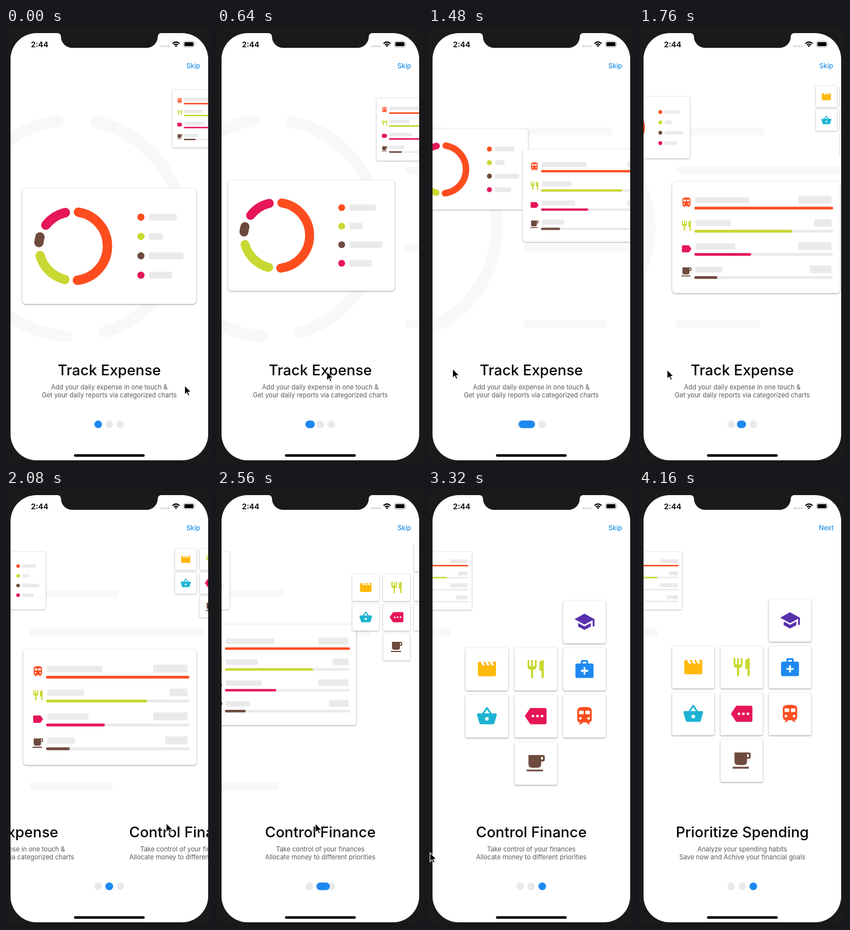
Recreate the animation shown at these times as an HTML page. Size 362 by 766 pixels, loop 4.2 s.

```html
<!DOCTYPE html>
<html lang="en">
<head>
<meta charset="utf-8">
<title>Expense onboarding</title>
<style>
  html, body { margin: 0; width: 100%; height: 100%; overflow: hidden; background: #1a1a1b; }
  svg { display: block; }
  text { font-family: Inter, "Open Sans", sans-serif; }
  .title { font-size: 25.9px; font-weight: 500; text-anchor: middle; fill: #050505; }
  .note { font-size: 11.35px; text-anchor: middle; fill: #5a5a5a; }
  .action { font-size: 11.7px; font-weight: 500; text-anchor: middle; fill: #1e8fe6; }
  .clock { font-size: 13.6px; font-weight: 600; }
  .sheet { fill: #fff; filter: drop-shadow(.8px 1.8px 1.6px rgba(0, 0, 0, .4)); }
  .ring { fill: none; stroke-linecap: round; }
</style>
</head>
<body>
<svg width="362" height="766" viewBox="0 0 362 766">
  <rect width="362" height="766" fill="#fff"/>
  <g id="backdrop"></g>
  <g id="chart"></g>
  <g id="list"></g>
  <g id="tiles"></g>
  <g id="copy"></g>
  <g fill="#e9e9ea">
    <circle cx="162.8" cy="699.5" r="6.7"/>
    <circle cx="182.3" cy="699.5" r="6.7"/>
    <circle cx="201.8" cy="699.5" r="6.7"/>
    <rect id="pill" y="692.8" height="13.4" rx="6.7" fill="#1d89f0"/>
  </g>
  <text id="action" class="action" x="330.7" y="70.5">Skip</text>
  <rect x="120" y="752.3" width="125" height="4.4" rx="2.2"/>

  <!-- bezel with notch -->
  <path fill="#1a1a1b" fill-rule="evenodd" d="M0 0H362V766H0Z
    M54 9H91A6 6 0 0 1 97 15A20 20 0 0 0 117 35H248A20 20 0 0 0 268 15A6 6 0 0 1 274 9H311
    A46 46 0 0 1 357 55V717A46 46 0 0 1 311 763H54A46 46 0 0 1 8 717V55A46 46 0 0 1 54 9Z"/>

  <text class="clock" x="44" y="34">2:44</text>
  <path d="M274.3 32.2H288" stroke="#c9c9c9" stroke-width="3.2" stroke-linecap="round" stroke-dasharray="0 4.3"/>
  <g fill="none" stroke="#000" stroke-width="2.1">
    <path d="M294 27.4Q300.2 21.7 306.4 27.4M296.5 30Q300.2 26.8 303.9 30"/>
    <path d="M298 31.3Q300.2 29.6 302.4 31.3L300.2 33.7Z" fill="#000" stroke="none"/>
  </g>
  <rect x="313.5" y="23.5" width="19" height="10" rx="2.8" fill="none" stroke="#a2a2a2"/>
  <rect x="315" y="25" width="16" height="7" rx="1.5"/>
  <path d="M333.8 26.8Q335.6 28.5 333.8 30.4Z" fill="#999"/>

  <path id="cursor" d="M0 0V16L3.7 12.6 6 18 8.6 17 6.3 11.6H11.4Z" stroke="#fff" stroke-width="1.1"/>
</svg>

<script>
const LOOP = 4200, STEP = 40, PAGE = 314;
const FAINT = '#f8f8f8', GRAY = '#eaeaea';
const ORANGE = '#fd4d1f', LIME = '#c8d832', PINK = '#e51757', BROWN = '#6e4a3e';
const AMBER = '#ffb80b', BLUE = '#1d89f0', TEAL = '#1cb3d2', VIOLET = '#5930ac';
const $ = id => document.getElementById(id);

// 24-unit icon shapes
const hole = (x, y, r = 1.5) => `M${x - r} ${y}a${r} ${r} 0 1 0 ${2 * r} 0 ${r} ${r} 0 1 0 ${-2 * r} 0z`;
const ICON = {
  film: 'M18 4l2 4h-3l-2-4h-2l2 4h-3l-2-4H8l2 4H7L5 4H4q-2 0-2 2v12q0 2 2 2h16q2 0 2-2V4z',
  food: 'M11 9H9V2H7v7H5V2H3v7q0 3.6 3.8 4v9h2.4v-9Q13 12.6 13 9V2h-2zM16 6v8h2.5v8H21V2q-5 .4-5 4z',
  kit: 'M20 6h-4V4q0-2-2-2h-4q-2 0-2 2v2H4q-2 0-2 2v12q0 2 2 2h16q2 0 2-2V8q0-2-2-2zM10 4h4v2h-4zM16 15h-3v3h-2v-3H8v-2h3v-3h2v3h3z',
  basket: 'M17.2 9l-4.4-6.6q-.8-.8-1.6 0L6.8 9H2q-1 0-1 1.2l2.6 9.3q.4 1.5 1.9 1.5h13q1.5 0 1.9-1.5L23 10.2Q23 9 22 9zM9 9l3-4.4L15 9z' + hole(12, 15, 2),
  more: 'M22 3H7q-1 0-1.6.9L0 12l5.4 8.1q.6.9 1.7.9H22q2 0 2-2V5q0-2-2-2z' + hole(9, 12) + hole(14, 12) + hole(19, 12),
  train: 'M12 2C8 2 4 2.5 4 6v9.5Q4 19 7.5 19L6 20.5v.5h2.2l2-2H14l2 2h2v-.5L16.5 19q3.5 0 3.5-3.5V6c0-3.5-3.6-4-8-4zM6 6h5v4H6zM13 6h5v4h-5z' + hole(7.5, 14.5) + hole(16.5, 14.5),
  school: 'M5 13.2v4L12 21l7-3.8v-4L12 17zM12 3L1 9l11 6 9-4.9V17h2V9z',
  cup: 'M20 3H4v10q0 4 4 4h6q4 0 4-4v-3h2q2 0 2-2V5q0-2-2-2zM18 5h2v3h-2zM2 19h18v2H2z',
  tag: 'M17.6 5.8Q17 5 16 5H5q-2 0-2 2v10q0 2 2 2h11q1 0 1.6-.8L22 12z'
};

const rect = (x, y, w, h, r, fill) =>
  `<rect x="${x}" y="${y}" width="${w}" height="${h}" rx="${r}" fill="${fill}"/>`;
// White card centred on a point
const sheet = (x, y, w, h, r) =>
  `<rect class="sheet" x="${x - w / 2}" y="${y - h / 2}" width="${w}" height="${h}" rx="${r}"/>`;
const icon = (name, x, y, k, fill) =>
  `<path d="${ICON[name]}" fill="${fill}" fill-rule="evenodd" transform="translate(${x} ${y}) scale(${k}) translate(-12 -12)"/>`;

function arc(cx, cy, r, from, to, width, color) {
  const at = deg => {
    const a = deg * Math.PI / 180;
    return `${cx + r * Math.cos(a)} ${cy + r * Math.sin(a)}`;
  };
  return `<path class="ring" stroke="${color}" stroke-width="${width}" d="M${at(from)}A${r} ${r} 0 0 1 ${at(to)}"/>`;
}

// Large pale echoes of the ring and of the list
$('backdrop').innerHTML =
  [[-78, 73.5], [93.5, 150], [230, 262]].map(([a, b]) => arc(119, 353, 191.5, a, b, 21, FAINT)).join('') +
  [[176, 156], [245, 309], [381, 248], [516, 147]].map(([y, w]) => rect(44 + PAGE, y, w, 13, 3, FAINT)).join('');

// Card artwork is laid out around its own centre
$('chart').innerHTML = sheet(0, 0, 307, 204, 6) +
  [[ORANGE, -81, 83, 49], [LIME, 104, 164, 24.5], [BROWN, 186, 195.5, 61], [PINK, 217.5, 257, 41]]
    .map(([c, from, to, w], i) => {
      const y = 34.2 * (i - 1.5);
      return arc(-64, 0, 60.7, from, to, 16.5, c) +
        `<circle cx="55.8" cy="${y}" r="6.3" fill="${c}"/>` + rect(70, y - 6, w, 12, 3, GRAY);
    }).join('');

$('list').innerHTML = sheet(0, 0, 307, 204.5, 6) +
  [['train', ORANGE, 98, 61, 1], ['food', LIME, 65, 32, .705], ['tag', PINK, 73, 61, .41], ['cup', BROWN, 49, 40, .166]]
    .map(([name, c, label, chip, share], i) => {
      const y = 42.3 * (i - 1.5);
      return icon(name, -127.5, y, .92, c) +
        rect(-111, y - 10, label, 11, 2, GRAY) +
        rect(138 - chip, y - 12, chip, 14, 2, GRAY) +
        rect(-113, y + 7.7, 254, 5, 2.5, GRAY) +
        rect(-113, y + 7.7, 254 * share, 5, 2.5, c);
    }).join('');

const GRID = [
  [null, null, ['school', VIOLET]],
  [['film', AMBER], ['food', LIME], ['kit', BLUE]],
  [['basket', TEAL], ['more', PINK], ['train', ORANGE]],
  [null, ['cup', BROWN], null]
];
$('tiles').innerHTML = GRID.flatMap((row, j) => row.map((cell, i) => {
  if (!cell) return '';
  const x = 86.2 * (i - 1), y = 83.2 * (j - 1.5);
  return sheet(x, y, 75.5, 75.5, 3) + icon(cell[0], x, y - .3, 1.6, cell[1]);
})).join('');

$('copy').innerHTML = [
  ['Track Expense', 'Add your daily expense in one touch &amp;', 'Get your daily reports via categorized charts'],
  ['Control Finance', 'Take control of your finances', 'Allocate money to different priorities'],
  ['Prioritize Spending', 'Analyze your spending habits', 'Save now and Achive your financial goals']
].map(([title, a, b], i) => {
  const x = 182.4 + i * PAGE;
  const line = (cls, y, s) => `<text class="${cls}" x="${x}" y="${y}">${s}</text>`;
  return line('title', 612.5, title) + line('note', 638, a) + line('note', 652, b);
}).join('');

const clamp = v => Math.min(1, Math.max(0, v));
const smooth = v => { v = clamp(v); return v * v * (3 - 2 * v); };

// Steady drag, then an exponential snap to just past the next page
function swipe(t, start, release) {
  const drag = .000617 * Math.max(0, Math.min(t, release) - start);
  const snap = 1 - Math.exp(-Math.max(0, t - release) / 88);
  return drag + (1.009 - drag) * snap;
}

const POINTER = [[0, 315.5, 631], [1000, 125.5, 592], [1700, 6, 606], [2080, 283, 588],
  [2880, 100.5, 589], [3320, 3.5, 640], [3400, -16, 650]];

function pointerAt(t) {
  const i = POINTER.findIndex(key => key[0] > t);
  if (i < 0) return POINTER[POINTER.length - 1].slice(1);
  const [t0, x0, y0] = POINTER[i - 1], [t1, x1, y1] = POINTER[i];
  const k = (t - t0) / (t1 - t0);
  return [x0 + (x1 - x0) * k, y0 + (y1 - y0) * k];
}

const place = (id, x, y, k = 1) =>
  $(id).setAttribute('transform', `translate(${x} ${y}) scale(${k})`);

// A card shrinks to half and rises as its page moves out of focus
function pose(id, offset, x, y, rise) {
  const away = Math.min(1, Math.abs(offset));
  place(id, x, y - rise * away, 1 - .5 * away);
}

function draw(t) {
  const p = swipe(t, 504, 1640) + swipe(t, 2151, 3040);
  const toList = 1 - p, toTiles = 2 - p;

  place('backdrop', -PAGE * p, 0);
  pose('chart', p, 182.5 - 187.75 * p, 385, 225);
  pose('list', toList, 185.5 + 314 * toList - 129 * toList * Math.abs(toList), 385, 225);
  pose('tiles', toTiles, 190 + 172 * toTiles + PAGE * Math.min(0, toTiles), 358, 216);

  const copy = smooth((t - 1920) / 290) + smooth((t - 3400) / 290);
  place('copy', -PAGE * copy, 0);
  $('action').textContent = copy > 1.5 ? 'Next' : 'Skip';

  // Leading edge of the pill stretches first, then the trailing edge follows
  const page = Math.min(1, Math.floor(p)), part = p - page;
  const left = 156.1 + 19.5 * (page + clamp(2 * part - 1));
  const right = 169.5 + 19.5 * (page + clamp(2 * part));
  $('pill').setAttribute('x', left);
  $('pill').setAttribute('width', right - left);

  place('cursor', ...pointerAt(t));
}

const start = performance.now();
function tick() {
  const t = (performance.now() - start) % LOOP;
  draw(Math.floor(t / STEP) * STEP);
  requestAnimationFrame(tick);
}
tick();
</script>
</body>
</html>
```
